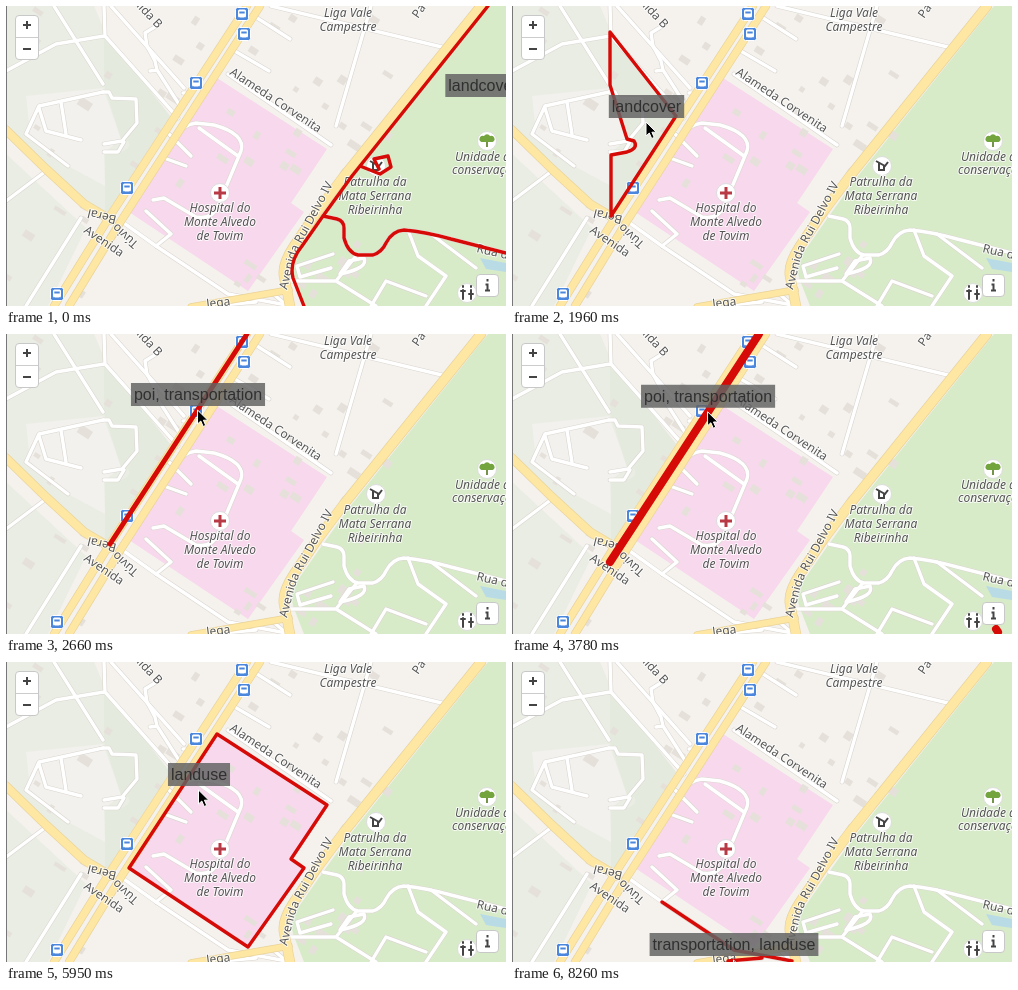
An HTML page that plays this animation: 500 by 300 pixels, repeating every 8890 ms.

```html
<!DOCTYPE html>
<html lang="pt">
<head>
<meta charset="utf-8">
<title>Map layer inspector</title>
<style>
html, body { margin: 0; width: 100%; height: 100%; overflow: hidden; background: #f5f2ee; }
svg { display: block; width: 100%; height: 100%; }
.lines { fill: none; stroke-linecap: round; stroke-linejoin: round; }
.label text { font: 12px "Noto Sans", "Open Sans", sans-serif; fill: #555; stroke: #fff; stroke-opacity: .8; stroke-width: 2px; paint-order: stroke; stroke-linejoin: round; }
.label .poi { font-style: italic; text-anchor: middle; }
.label .start { text-anchor: start; }
#marks { stroke: #d60b08; stroke-width: 3.4; }
#marks path { display: none; }
#tip text { font: 16px "Liberation Sans", Arial, sans-serif; fill: #303030; text-anchor: middle; }
.control { fill: #fff; stroke: #c8c8c8; }
.glyph { fill: none; stroke: #444; stroke-width: 2; }
</style>
</head>
<body>
<svg viewBox="0 0 500 300" preserveAspectRatio="none">
  <defs>
    <path id="streetLabel" d="M281 284L288 256Q292 241 302 226L333 167"/>
    <g id="bus">
      <rect x="-6.5" y="-6.5" width="13" height="13" rx="2" fill="#4b87dc" stroke="#fff"/>
      <rect x="-4" y="-4.5" width="8" height="8" rx="1.5" fill="#fff"/>
      <path d="M-2.7-1.5H2.7M-2.8 4.2h.6M2.2 4.2h.6" stroke="#4b87dc" stroke-width="2"/>
    </g>
  </defs>

  <rect width="500" height="300" fill="#f5f2ee"/>
  <path fill="#e9ede3" d="M0 0H88L99 26L164 110L99 210L78 197L0 122ZM0 148L80 222L42 300H0Z"/>
  <path fill="#f3f1ed" d="M20 90L97 82L115 133L98 147L99 180L62 160L24 128Z"/>
  <g id="areas"></g>
  <path fill="#b9dbe6" d="M474 252L500 257V266L480 263Z"/>
  <g id="buildings" fill="#e5e1da"></g>
  <g id="roads" class="lines"></g>

  <g class="label">
    <use href="#bus" x="236" y="8"/><use href="#bus" x="238" y="28"/>
    <use href="#bus" x="190" y="77"/><use href="#bus" x="121" y="182"/>
    <use href="#bus" x="51" y="288"/>
    <g fill="#fff" stroke="#ddd">
      <circle cx="214" cy="187" r="9.5"/><circle cx="370" cy="160" r="9.5"/>
      <circle cx="481" cy="135" r="9.5"/><circle cx="461" cy="287" r="9.5"/>
    </g>
    <path d="M214 181V193M208 187H220" stroke="#b83a44" stroke-width="3"/>
    <path class="glyph" d="M364 155L373 160L376 156M367 157V164H372V160"/>
    <path d="M481 135V141" stroke="#76934b" stroke-width="2"/>
    <path fill="#73a43e" d="M475.500 136A3 3 0 0 1 478 130A3.500 3.500 0 0 1 484 130A3 3 0 0 1 486.500 136Z"/>
    <path class="glyph" stroke-linecap="round" d="M457 284V293M465 284V293M455 285H459M463 288H467M457 280V281M465 280V281"/>
    <g id="names"></g>
    <text transform="translate(223 68) rotate(33.500)">Alameda Corvenita</text>
    <text transform="translate(77 226) rotate(34)">Avenida</text>
    <text transform="translate(133 237) rotate(222)">Túvio</text>
    <text transform="translate(111 210) rotate(194)">Beral</text>
    <text transform="translate(127 -3) rotate(47)">nida B</text>
    <text transform="translate(412 13) rotate(-55)">Pa</text>
    <text transform="translate(470 246) rotate(13)">Rua d</text>
    <text transform="translate(201 302) rotate(-7)">lega</text>
    <text><textPath href="#streetLabel">Avenida Rui Delvo IV</textPath></text>
  </g>

  <g id="marks" class="lines"></g>

  <rect class="control" x="9.500" y="9.500" width="23" height="44" rx="3.500"/>
  <path d="M10 31.500H32" stroke="#ccc"/>
  <path class="glyph" d="M17 19H25M21 15V23M17 43H25"/>
  <rect class="control" x="470.500" y="268.500" width="22" height="22" rx="3.500"/>
  <path class="glyph" d="M481.500 273V275.500M479.500 278.500H481.500V284.500M479 284.500H484"/>
  <path d="M.5 0V300" stroke="#777"/>

  <g id="tip"><rect y="-28" height="23" fill="#646464" fill-opacity=".84"/><text y="-11"></text></g>
  <path id="cursor" d="M0 0V14L3.300 11L5.700 16.500L8.200 15.400L5.900 10.200H10.300Z" stroke="#fff"/>
</svg>
<script>
const SVG = "http://www.w3.org/2000/svg";
const $ = id => document.getElementById(id);
function add(parent, tag, attrs, text) {
  const node = document.createElementNS(SVG, tag);
  for (const key in attrs) node.setAttribute(key, attrs[key]);
  if (text) node.textContent = text;
  return parent.appendChild(node);
}

// Geometry shared by the base map, the highlights and the hit test
const westLane = "M241 0L104 210";
const midLane = "M247 0L98 228";
const westStreet = "M0 124L40 163L78 198L105 214";
const eastAvenue = "M475 0L338 170L311 206L288 240Q276 258 278 270L284 300";
const parkLane = "M317 210L331 213Q338 215 338 222V232Q342 247 352 249H367Q376 246 380 237Q386 225 398 224Q420 226 445 233L500 247";
const yard = "M158 152L168 132Q176 119 190 117L208 119Q240 128 235 145L212 200Q206 214 190 211L158 192L147 194M193 122L232 150M158 152L180 160M163 128L185 150";
const lanes = "M97 86H103L106 92L130 93L131 117L116 135L98 138M118 136L112 146H98M152 19L139 27L141 40L149 55L151 64L144 65M151 64L160 78L176 103M177 87H184M248 10L284 33M227 44L263 65M327 248L291 260L294 271L325 262M334 268L343 255L358 252Q363 262 334 268M266 287L278 297L283 290";
const cross = "M150 240L222 288L280 299M216 299L250 296";
const landuse = "M211 72L321 143L285 197L298 206L242 285L123 206Z";
const wood = "M98 26L164 110L99 210V149L115 146Q127 142 122 135L115 133L98 79Z";
const forestEdge = "M482 0L346 170L317 210L296 240Q283 256 287 272L298 300";
const forest = forestEdge + "H500V0Z";
const station = "M354 160L374 168L385 161L382 150L368 153L373 163";

add($("areas"), "path", { d: wood, fill: "#e5eade" });
add($("areas"), "path", { d: forest, fill: "#d8ebc9" });
add($("areas"), "path", { d: landuse, fill: "#f8d8ec" });

// Small buildings scattered over the blocks, aligned with the main road
let seed = 7;
const random = () => (seed = seed * 16807 % 2147483647) / 2147483647;
for (let i = 0; i < 60; i++) {
  const x = random() * 380, y = random() * 290;
  add($("buildings"), "rect", {
    x, y, width: 5 + random() * 9, height: 4 + random() * 5, transform: `rotate(33 ${x} ${y})`
  });
}

const minor = [
  yard, lanes, cross, parkLane, "M115 215L150 240",
  "M0 65L50 38L98 30M48 0L97 78M98 0L99 30L172 112M105 0L178 82",
  "M62 160L20 128L33 100L97 86M33 102L40 125L75 134M55 96L60 128M0 195L40 165M20 300L75 212",
  "M222 68L325 139M265 0L440 42M365 0L330 120M140 205L165 228L150 240",
  "M284 275L330 275L370 300M350 250L330 275M365 300L380 275L420 290M402 224L412 250L440 270L420 300M425 228L470 262"
];
const yellow = [
  [westStreet, 8], [westLane + "L48 300", 7], ["M254 0L115 215L63 300", 7],
  [eastAvenue, 9], ["M185 301L283 284", 6]
];
function drawRoads(color, extra, roads) {
  for (const [d, width] of roads)
    add($("roads"), "path", { d, stroke: color, "stroke-width": width + extra });
}
const white = minor.map(d => [d, 3.4]);
drawRoads("#dad6d0", 1.2, white);
drawRoads("#fff", 0, white);
drawRoads("#ead39a", 1.4, yellow);
drawRoads("#fde7a2", 0, yellow);

function poi(x, y, lines, cls = "poi") {
  lines.forEach((line, i) => add($("names"), "text", { x, y: y + i * 14, class: cls }, line));
}
poi(342, 11, ["Liga Vale", "Campestre"]);
poi(214, 206, ["Hospital do", "Monte Alvedo", "de Tovim"]);
poi(369, 180, ["Patrulha da", "Mata Serrana", "Ribeirinha"]);
poi(449, 155, ["Unidade de"], "poi start");
poi(446, 168, ["conservação"], "poi start");

// Top layer first. With "reach" the hit shape is a stroke of that width, else a filled area.
const layers = [
  { tip: "poi, transportation", hit: westLane, reach: 7, draw: westLane, width: 5 },
  { tip: "poi, transportation", hit: midLane, reach: 7, draw: midLane + "M484 295L486 298", width: 8 },
  { tip: "transportation", hit: eastAvenue, reach: 12, draw: westStreet + eastAvenue + parkLane },
  { tip: "transportation, landuse", hit: yard, reach: 6, draw: yard + lanes + landuse },
  { tip: "transportation, landuse", hit: cross, reach: 6, draw: cross },
  { tip: "landuse", hit: landuse, draw: landuse },
  { tip: "landcover", hit: wood, draw: wood },
  { tip: "landcover", hit: forest, draw: forestEdge + parkLane + station }
];
for (const layer of layers) {
  layer.shape = new Path2D(layer.hit);
  layer.mark = add($("marks"), "path", { d: layer.draw });
  if (layer.width) layer.mark.setAttribute("stroke-width", layer.width);
  if (layer.width) layer.mark.style.strokeWidth = layer.width;
}
const probe = document.createElement("canvas").getContext("2d");
probe.font = '16px "Liberation Sans", Arial, sans-serif';
function layerAt(x, y) {
  return layers.find(({ shape, reach }) => {
    if (!reach) return probe.isPointInPath(shape, x, y);
    probe.lineWidth = reach;
    return probe.isPointInStroke(shape, x, y);
  });
}

// Pointer moves: first step, last step, destination
const LOOP = 8890, STEP = 70;
const moves = [
  [70, 70, 400, 60], [140, 630, 214, 166], [840, 1120, 448, 110], [1330, 1960, 134.5, 117],
  [2030, 2170, 120, 100], [2240, 2660, 192, 77], [2730, 2940, 194, 74.5], [3780, 4130, 222, 132],
  [4340, 4690, 215.7, 175], [5040, 5320, 190, 88], [5880, 6090, 196, 170],
  [6580, 6790, 148.5, 194], [7840, 8260, 222, 299]
];
function pointer(t) {
  let x = 477, y = 96;
  for (const [first, last, toX, toY] of moves) {
    const p = Math.min(1, Math.max(0, (t - first + STEP) / (last - first + STEP)));
    const ease = p * p * (3 - 2 * p);
    x += (toX - x) * ease;
    y += (toY - y) * ease;
  }
  return [x, y];
}

const [box, caption] = $("tip").children;
function draw(now) {
  const t = Math.floor((now % LOOP) / STEP) * STEP;
  const [x, y] = pointer(t);
  const hovered = layerAt(x, y);
  for (const layer of layers) layer.mark.style.display = layer === hovered ? "inline" : "none";
  $("tip").style.display = hovered ? "inline" : "none";
  if (hovered) {
    const width = probe.measureText(hovered.tip).width + 6;
    caption.textContent = hovered.tip;
    box.setAttribute("width", width);
    box.setAttribute("x", -width / 2);
  }
  $("tip").setAttribute("transform", `translate(${x} ${y})`);
  $("cursor").setAttribute("transform", `translate(${x - 0.5} ${y - 1})`);
  $("cursor").style.display = t < STEP ? "none" : "inline";
}
const start = performance.now();
function tick() {
  draw(performance.now() - start);
  requestAnimationFrame(tick);
}
tick();
</script>
</body>
</html>
```
